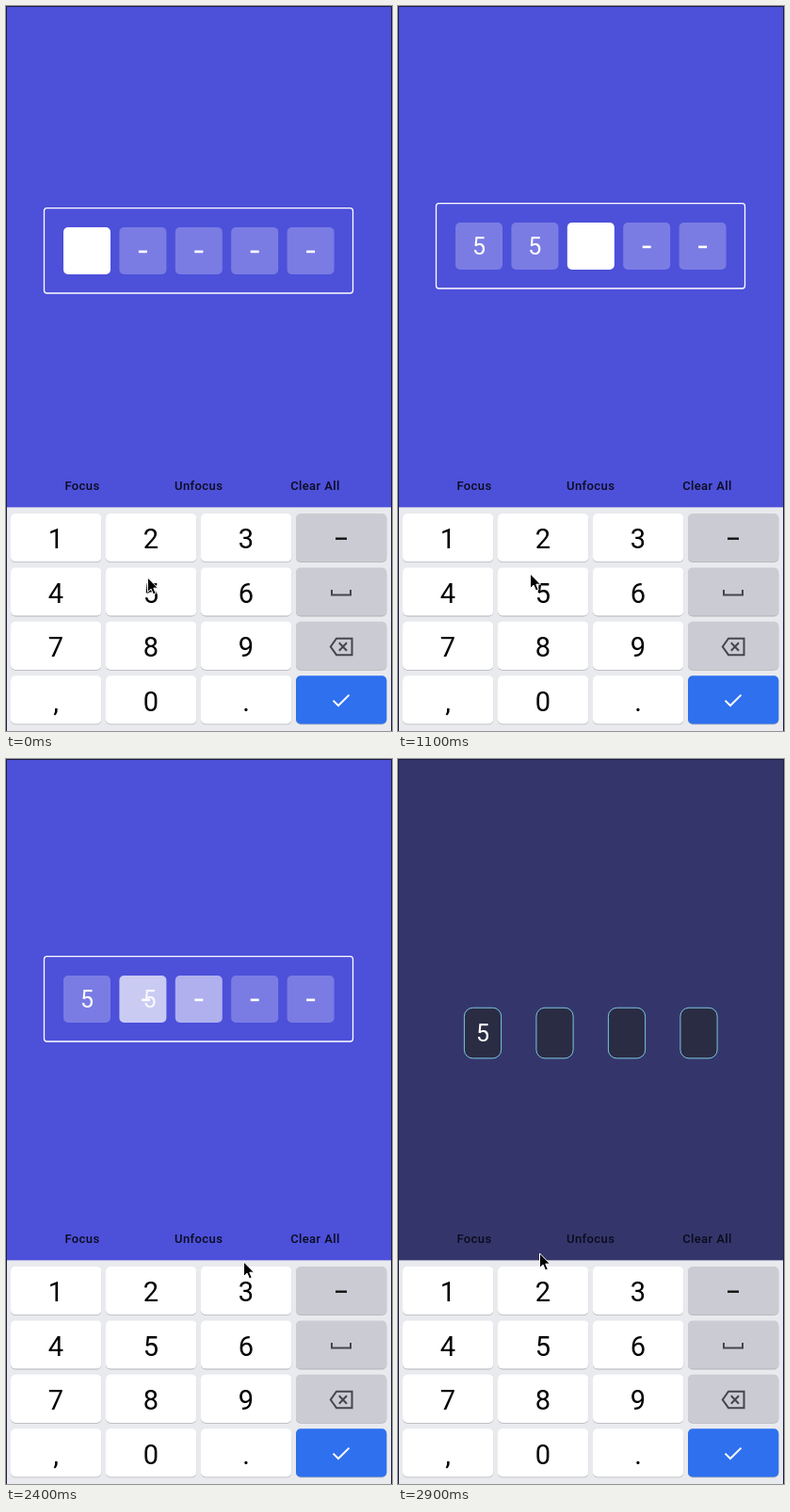
These frames come from a looping animation (410x770 px, 3 s). An HTML page:

```html
<!DOCTYPE html>
<html lang="en">
<head>
<meta charset="utf-8">
<title>PIN input</title>
<style>
  html, body { margin: 0; width: 100%; height: 100%; overflow: hidden; }
  svg { display: block; width: 410px; height: 770px; }
  text { font-family: Roboto, sans-serif; text-anchor: middle; }
  .pin { font-size: 25px; fill: #fff; }
  .key { font-size: 29px; fill: #000; }
  .label { font-size: 13px; font-weight: 500; letter-spacing: .4px; fill: #0a0b1c; }
</style>
</head>
<body>
<script>
const LOOP = 3000, STEP = 100, PAGE = 510;

function add(parent, tag, attrs = {}, text) {
  const node = document.createElementNS('http://www.w3.org/2000/svg', tag);
  set(node, attrs);
  if (text !== undefined) node.textContent = text;
  if (parent) parent.append(node);
  return node;
}
function set(node, attrs) {
  for (const name in attrs) node.setAttribute(name, attrs[name]);
}
function rect(parent, x, y, width, height, rx, attrs) {
  return add(parent, 'rect', { x, y, width, height, rx, ...attrs });
}
function label(parent, cls, x, y, text) {
  return add(parent, 'text', { class: cls, x, y }, text);
}
function line(parent, d, stroke, width) {
  return add(parent, 'path', { d, stroke, 'stroke-width': width, fill: 'none' });
}
const mix = (a, b, p) => a + (b - a) * p;
const smooth = p => p * p * (3 - 2 * p);

const svg = add(null, 'svg', { viewBox: '0 0 410 770' });
document.body.append(svg);
const back = rect(svg, 0, 0, 410, 770, 0);

// First page: five framed cells
const page1 = add(svg, 'g');
rect(page1, 40.5, 209.7, 328, 90.3, 3, { fill: 'none', stroke: '#fff', 'stroke-width': 1.3 });
const cells = [0, 1, 2, 3, 4].map(i => {
  const x = 61 + i * 59.4;
  return {
    box: rect(page1, x, 230, 50, 50, 5, { fill: '#fff' }),
    dash: rect(page1, x + 20.5, 254.6, 9, 2.6, 0, { fill: '#fff' }),
    digit: label(page1, 'pin', x + 25, 264, '5')
  };
});

// Second page: four dark cells
const page2 = add(svg, 'g');
for (let i = 0; i < 4; i++) {
  rect(page2, 70.4 + i * 76.5, 228.3, 39.2, 53.6, 9, { fill: '#2a2c44', stroke: '#7cc6dc' });
}
label(page2, 'pin', 90, 264, '5');

['Focus', 'Unfocus', 'Clear All'].forEach((text, i) => label(svg, 'label', 81 + i * 123.7, 514, text));

// Keyboard
rect(svg, 0, 532.4, 410, 238, 0, { fill: '#e9eaee' });
const keys = {};
['123−', '456_', '789<', ',0.!'].forEach((row, r) => [...row].forEach((ch, c) => {
  const x = 5 + c * 101, y = 539 + r * 57.4;
  const fill = c < 3 ? '#fff' : r < 3 ? '#cbccd3' : '#2e70ee';
  rect(svg, x, y + 1, 96.3, 51, 5, { fill: '#b2b3b8' });
  keys[ch] = rect(svg, x, y, 96.3, 51.2, 5, { fill });
  if (c < 3) label(svg, 'key', x + 48, y + 37.4, ch);
}));
line(svg, 'M350 565.7H362', '#111', 2.4);
line(svg, 'M346 620V625.4H366V620', '#45464c', 2);
line(svg, 'M351 671.7H367.5V689.2H351L344.8 680.5Z', '#45464c', 2);
line(svg, 'M353.8 676.2L362 684.7M362 676.2L353.8 684.7', '#45464c', 2);
line(svg, 'M347.5 737.6L353 743L364.5 731.6', '#fff', 2);

line(svg, 'M.5 770V.5H409.5V770', '#1c1e44', 1);

const pointer = add(svg, 'path', {
  d: 'M.5 1V16.5L4.1 13.2L6.5 19L9.2 17.9L6.8 12.2H11.5Z',
  fill: '#000', stroke: '#fff', 'stroke-width': 1
});

// Pointer stops: [time, x, y]
const stops = [
  [0, 150, 606], [500, 186, 617], [1100, 140, 602], [1400, 144, 608], [1800, 334, 677],
  [2200, 342, 672], [2400, 252, 533], [2800, 205, 231], [2900, 150, 524]
];
// Digits entered: [time, count]
const counts = [[0, 0], [400, 1], [900, 2], [1400, 3], [2000, 2], [2400, 1]];

function pointerAt(t) {
  const n = stops.findIndex(s => s[0] > t);
  if (n < 0) return stops[stops.length - 1].slice(1);
  const [t0, x0, y0] = stops[n - 1], [t1, x1, y1] = stops[n];
  const p = smooth((t - t0) / (t1 - t0));
  return [mix(x0, x1, p), mix(y0, y1, p)];
}

// The last swipe settles, then a new drag speeds up and is flung
function scrollAt(t) {
  const settle = ms => 0.31 ** (ms / 100);
  if (t < 2500) return -5 * settle(t);
  if (t < 2800) return 394 * ((t - 2500) / 300) ** 2.5;
  return PAGE - 116 * settle(t - 2800);
}

function tintAt(y) {
  const p = Math.min(1, Math.max(0, y / 474) ** 6);
  return `rgb(${[mix(77, 52, p), mix(80, 54, p), mix(217, 107, p)].map(Math.round)})`;
}

function drawCells(t) {
  const at = counts.findLastIndex(k => k[0] <= t);
  const [start, now] = counts[at];
  const before = at ? counts[at - 1][1] : now;
  const p = Math.min(1, 0.6 + (t - start) / 250);
  cells.forEach(({ box, dash, digit }, i) => {
    const shown = mix(+(i < before), +(i < now), p);
    const focus = mix(+(i === before), +(i === now), p);
    set(box, { opacity: 0.25 + 0.75 * focus });
    set(digit, { opacity: Math.min(1, shown * 2.2), transform: `translate(${12 * (1 - shown)} 0)` });
    set(dash, { opacity: Math.min(1, (1 - shown) * 1.6), transform: `translate(${8 * shown} 0)` });
  });
  const typing = counts.some(([time, n], i) => i && n > counts[i - 1][1] && t >= time - 100 && t < time + 200);
  set(keys[5], { fill: typing ? '#e5e5e5' : '#fff' });
}

function draw(t) {
  const y = scrollAt(t);
  set(back, { fill: tintAt(y) });
  set(page1, { transform: `translate(0 ${-y})` });
  set(page2, { transform: `translate(0 ${PAGE - y})`, visibility: y > 0 ? 'visible' : 'hidden' });
  set(pointer, { transform: `translate(${pointerAt(t).join(' ')})` });
  drawCells(t);
}

const begin = performance.now();
function tick() {
  const t = (performance.now() - begin) % LOOP;
  draw(Math.floor(t / STEP) * STEP);
  requestAnimationFrame(tick);
}
tick();
</script>
</body>
</html>
```
